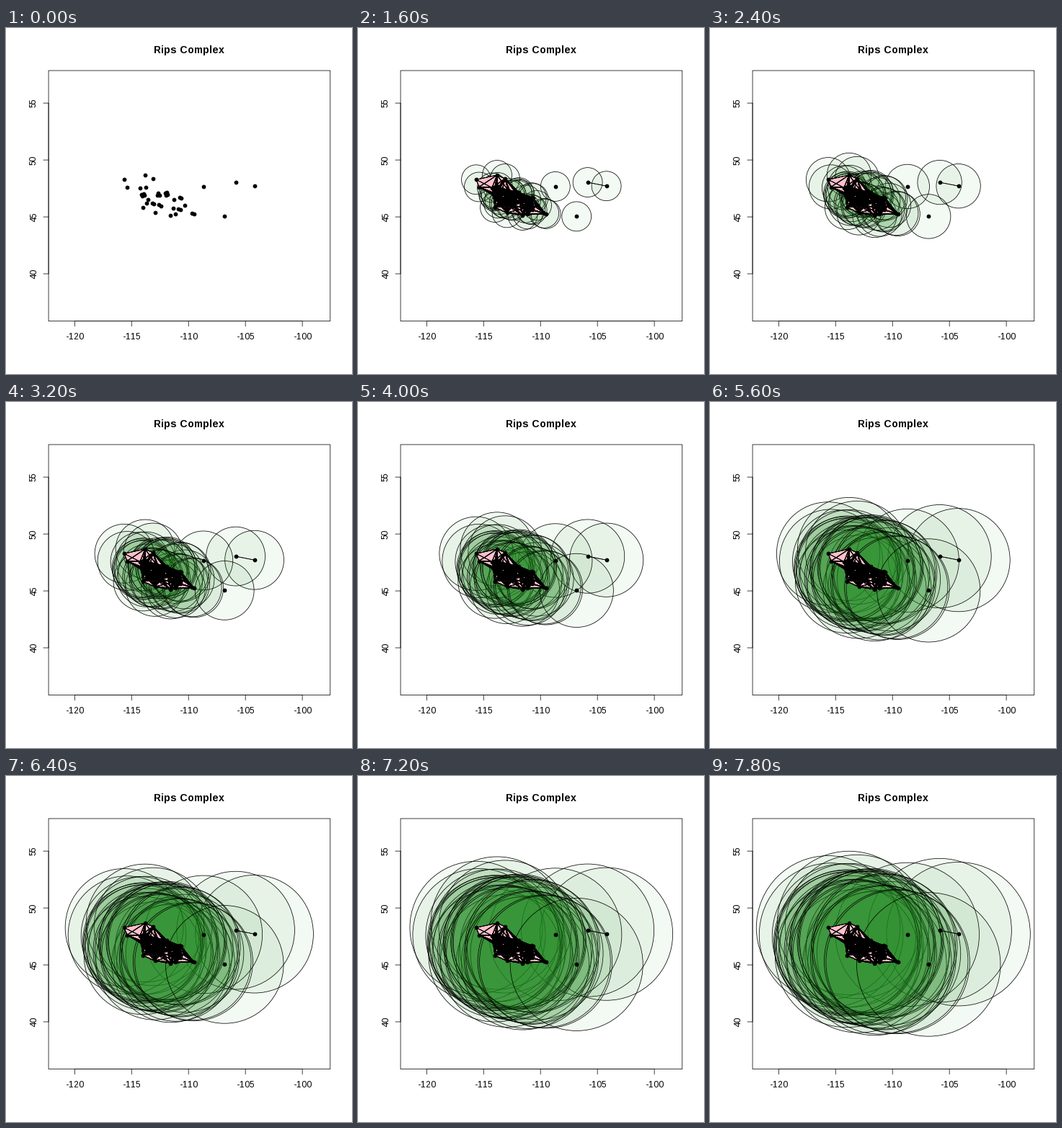
Animation, 480 px wide and 480 px high, one loop 8000 ms. Source, as a matplotlib script:

```python
from itertools import combinations

import matplotlib.pyplot as plt
import numpy as np
from matplotlib.animation import FuncAnimation
from matplotlib.collections import LineCollection, PolyCollection
from matplotlib.patches import Circle, Rectangle

SIZE, DPI = 480, 72
FRAMES, INTERVAL = 40, 200
UNIT = 15.79            # pixels per degree
GROWTH = 2.557          # radius gain per frame, pixels
MAX_EDGE = 2 * UNIT     # longest edge in the complex
THIN = 0.75
LEFT, TOP, RIGHT, BOTTOM = 59.04, 59.04, 449.76, 406.56

plt.rcParams.update({
    "font.family": "Liberation Sans",
    "text.hinting": "force_autohint",
    "text.hinting_factor": 1,
})


def cluster(x, y, count):
    """A few sites spread evenly around one centre."""
    radius = 0.6 + 0.35 * count
    turn = 0.4 + 2 * np.pi * np.arange(count) / count
    return np.column_stack([x + radius * np.cos(turn),
                            y + radius * np.sin(turn)])


east = [(344.6, 219.2), (318.6, 214.1), (273.8, 219.9)]
north = [(164, 210.3), (168, 220.5), (193, 204), (204, 209), (186, 221.5),
         (194, 221)]
south = [(196.6, 238), (195, 243.3), (190, 249), (206.6, 256.4),
         (233.2, 238.4), (231.6, 249.8), (228.4, 260), (235.4, 258.4),
         (248, 246)]
towns = [cluster(190, 231.5, 4), cluster(211.5, 231, 3),
         cluster(222.5, 230, 4)]
towns += [cluster(x, y, 2) for x, y in
          [(204, 243.4), (213.5, 246), (242, 235.7), (240.4, 251.8),
           (259.4, 257.4)]]
POINTS = np.vstack([east, north, south, *towns, (303.2, 261.4)])


def simplices(order):
    """Longest side and corners of every simplex within reach."""
    found = []
    for corners in combinations(POINTS, order):
        reach = max(np.hypot(*(a - b)) for a, b in combinations(corners, 2))
        if reach <= MAX_EDGE:
            found.append((reach, np.array(corners)))
    return found


edges, triangles = simplices(2), simplices(3)

fig = plt.figure(figsize=(SIZE / DPI, SIZE / DPI), dpi=DPI, facecolor="white")
ax = fig.add_axes([0, 0, 1, 1])
ax.set(xlim=(0, SIZE), ylim=(SIZE, 0))
ax.axis("off")


def line(xs, ys):
    ax.plot(xs, ys, color="black", lw=THIN, snap=False, zorder=1,
            solid_capstyle="round")


def label(x, y, text, **style):
    ax.text(x, y, text, ha="center", va="baseline",
            rotation_mode="anchor", **style)


def draw_axes():
    ax.add_patch(Rectangle((LEFT, TOP), RIGHT - LEFT, BOTTOM - TOP, fill=False,
                           ec="black", lw=THIN, snap=False, zorder=1))
    lon = {v: 253.2 + (v + 110) * UNIT for v in range(-120, -99, 5)}
    lat = {v: 183.1 + (50 - v) * UNIT for v in range(40, 56, 5)}
    line([lon[-120], lon[-100]], [BOTTOM] * 2)
    line([LEFT] * 2, [lat[40], lat[55]])
    for value, x in lon.items():
        line([x, x], [BOTTOM, BOTTOM + 7.2])
        label(x, 432, str(value), size=12)
    for value, y in lat.items():
        line([LEFT - 7.2, LEFT], [y, y])
        label(42, y, str(value), size=12, rotation=90)
    label((LEFT + RIGHT) / 2 - 0.6, 35, "Rips Complex", size=14.4,
          weight="bold")


draw_axes()

green = (34 / 255, 139 / 255, 34 / 255, 0.05)
balls = [ax.add_patch(Circle(p, 0, fc=green, ec="black", lw=THIN, zorder=2))
         for p in POINTS]
faces = ax.add_collection(
    PolyCollection([], fc="pink", ec="none", zorder=3), autolim=False)
# Shared sides are stroked once per triangle, so dense parts look heavier.
borders = ax.add_collection(
    PolyCollection([], fc="none", ec="black", lw=THIN, joinstyle="round",
                   zorder=4), autolim=False)
links = ax.add_collection(
    LineCollection([], colors="black", lw=THIN, capstyle="round", zorder=5),
    autolim=False)
ax.plot(*POINTS.T, "o", color="black", ms=5.8, mew=0, zorder=6)


def update(frame):
    radius = GROWTH * frame
    for ball in balls:
        ball.set_radius(radius)
        ball.set_visible(frame > 0)
    tris = [t for reach, t in triangles if reach <= 2 * radius]
    faces.set_verts(tris)
    borders.set_verts(tris)
    # Each edge is traced there and back.
    links.set_segments([e for reach, e in edges if reach <= 2 * radius] * 2)
    return [*balls, faces, borders, links]


anim = FuncAnimation(fig, update, frames=FRAMES, interval=INTERVAL,
                     repeat=True, repeat_delay=0, blit=False)
plt.show()
```
